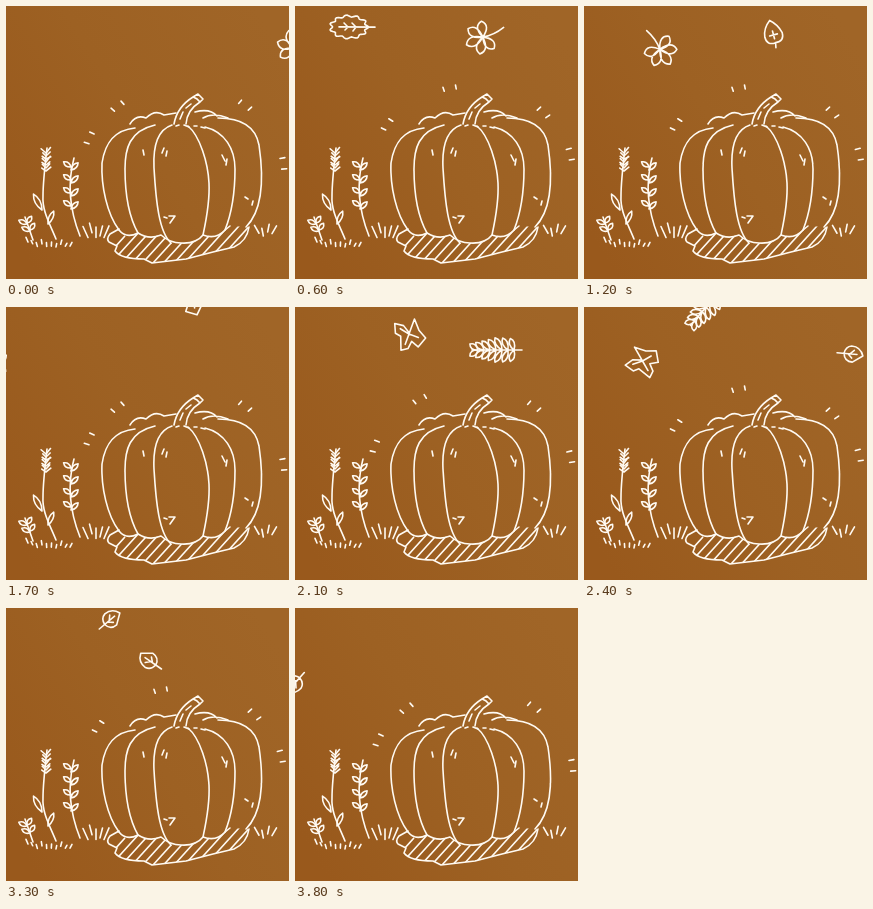
An HTML page for the animation above (3900 ms loop, 283x273 px).

```html
<!DOCTYPE html>
<html lang="en">
<head>
<meta charset="utf-8">
<title>Autumn pumpkin</title>
<style>
html, body { margin: 0; width: 100%; height: 100%; overflow: hidden; background: #9d6022; }
svg { display: block; width: 283px; height: 273px; }
.ink path { fill: none; stroke: #fffaf2; stroke-width: 1.6; stroke-linecap: round; stroke-linejoin: round; }
</style>
</head>
<body>
<svg viewBox="0 0 283 273">
  <defs>
    <linearGradient id="paper" x1="0" y1=".8" x2="1" y2=".2">
      <stop offset="0" stop-color="#99591c"/>
      <stop offset=".5" stop-color="#9d6123"/>
      <stop offset="1" stop-color="#a06527"/>
    </linearGradient>
    <clipPath id="ground">
      <path id="shadow" d="M113 223L104 228 102 235 111 240 109 245 119 252 138 253 146 257 180 253 207 246 228 241 240 232 243 221 224 220 210 231 197 229 185 237 165 237 155 229 142 231 132 227 120 231Z"/>
    </clipPath>
  </defs>
  <rect width="283" height="273" fill="url(#paper)"/>
  <g class="ink">
    <!-- pumpkin ribs -->
    <path d="M129 122C108 124 99 137 96 157C95 180 101 208 113 224"/>
    <path d="M149 119C123 125 119 143 119 163C119 188 123 211 132 227"/>
    <path d="M166 119C151 124 147 142 148 162C150 196 153 226 165 237"/>
    <path d="M182 120C194 130 202 157 203 177C204 197 200 215 197 229"/>
    <path d="M199 121C219 126 229 143 229 163C229 188 225 209 219 224"/>
    <path d="M212 112C239 112 250 123 253 139C258 173 256 205 240 221"/>
    <!-- crown, base, stalk -->
    <path d="M124 118Q130 108 140 112Q149 103 158 109L170 107M170 120L173 119M178 119L183 121M188 120L191 120M195 121L199 122M189 106Q204 102 211 110M197 112Q207 106 222 112"/>
    <path d="M113 224Q120 233 132 227Q143 234 155 229Q164 237 175 237Q190 238 197 229Q210 234 219 224L224 220"/>
    <path d="M168 118Q171 101 187 91L192 88 197 93 194 96Q181 104 180 118M187 91Q191 92 194 96M174 113L177 106M180 102L185 98"/>
    <path d="M137 144L138 149M158 142L156 147M161 145L160 150M216 149L219 155M221 153L220 159M239 191L242 193M247 195L246 199M158 211L161 212M163 210L169 210 164 217"/>
    <path d="M113 223L104 228Q100 233 103 236L111 240 109 245Q115 253 138 253L146 257 180 253 207 246 228 241Q241 235 243 221"/>
    <path id="hatch" clip-path="url(#ground)"/>
    <!-- plants -->
    <path d="M50 233C44 218 36 205 37 190Q37 176 41 142M74 230Q58 190 68 152M27 234L19 211"/>
    <path id="foliage"/>
    <path id="grass"/>
    <path id="rays"/>
    <g id="leaves"></g>
  </g>
</svg>
<script>
const LOOP = 3900, STEP = 100, SPIN = -100 / 600;
const $ = id => document.getElementById(id);
const repeat = (n, f) => Array.from({ length: n }, (_, i) => f(i)).join("");

let seed = 7;
const random = () => (seed = seed * 16807 % 2147483647) / 2147483647;

// Leaflet from (x, y); belly is where along its length it is widest
function petal(x, y, deg, length, width, belly = .55) {
  const a = deg * Math.PI / 180, c = Math.cos(a), s = Math.sin(a);
  const at = (u, v) => `${(x + u * c - v * s).toFixed(1)} ${(y + u * s + v * c).toFixed(1)}`;
  const u = length * belly;
  return `M${at(0, 0)}Q${at(u, -width)} ${at(length, 0)}Q${at(u, width)} ${at(0, 0)}`;
}

// Blades fan out from left to right across the tuft
const tuft = (x, width, n, y, length) => repeat(n, i => {
  const k = i / (n - 1), lean = (k - .5) * length;
  return `M${x + k * width} ${y + random() * 6 - 3}l${lean} ${-length * (.7 + random() * .5)}`;
});

$("hatch").setAttribute("d", repeat(15, i => `M${90 + i * 10.5} 262l38 -42`));
$("grass").setAttribute("d",
  tuft(22, 42, 10, 239, 4) + tuft(82, 16, 5, 229, 10) + tuft(253, 13, 4, 228, 9));
$("foliage").setAttribute("d",
  repeat(7, i => [-1, 1].map(side =>
    `M40 ${147 + i * 3}l${side * (3 + random() * 2)} ${-2 - random() * 4}`).join("")) +
  repeat(4, i => petal(65, 161 + i * 13, -145, 9, 4) + petal(65, 164 + i * 13, -45, 10, 4)) +
  repeat(2, i => petal(21 + i * 3, 218 + i * 7, -155, 9, 4) + petal(21 + i * 3, 217 + i * 7, -55, 8, 4)) +
  petal(36, 204, -118, 18, 5) + petal(42, 218, -66, 14, 4));

// Leaf outlines, each with its stem pointing along +x
const oak = repeat(73, i => {
  const a = i * Math.PI / 36, r = 1 + .09 * Math.cos(11 * a);
  return `${i ? "L" : "M"}${(-3 + 18 * r * Math.cos(a)).toFixed(1)} ${(11 * r * Math.sin(a)).toFixed(1)}`;
}) + "M-13 0H23M-8 -4L-4 0 -7 3M0 -4L4 0 1 4";
const chestnut = repeat(5, i => petal(2, 0, 70 + i * 55, 18 - Math.abs(i - 2), 9, .7)) + "M2 0Q13 3 25 0";
const linden = "M15 1L10 0Q11 -9 2 -9Q-7 -7 -13 0Q-7 8 2 9Q11 9 10 0M-2 0H6M2 -4V4";
const maple = "M16 0H1L6 -8 5 -17 -4 -13 -5 -7 -18 -2 -14 4 -6 5 -9 13 2 17 7 8ZM0 0L2 -10M0 0H-11M0 0V10";
const rowan = "M-25 0H25" + repeat(7, i => [-1, 1].map(side =>
  petal(17 - i * 6, 0, side * (108 + i * 6), 14 - Math.abs(i - 2), 5, .65)).join(""));
const birch = "M14 0H-6M7 0Q6 -8 -2 -8L-12 -1Q-9 8 0 8Q6 7 7 0M3 0L-1 -4M1 0L-3 4";

// Shape, stem angle at the first point, then points of the path as [time, x, y]
const flights = [
  [chestnut, 75, [0, 287, 40], [600, 186, 32], [1200, 77, 45]],
  [oak, 67, [200, 150, -18], [600, 57, 21]],
  [linden, 125, [900, 294, 60], [1200, 189, 27]],
  [maple, -70, [2100, 114, 27], [2700, 3, 81]],
  [rowan, 0, [2100, 202, 43], [2600, 70, -30]],
  [birch, 135, [2700, 226, 49], [3300, 144, 53], [3800, 0, 75]],
  [birch, 240, [2700, 253, 31], [3300, 104, 12], [3500, 62, -17]]
].map(([shape, angle, ...path]) => {
  const node = document.createElementNS("http://www.w3.org/2000/svg", "path");
  node.setAttribute("d", shape);
  $("leaves").append(node);
  return { node, angle, path };
});

// Linear along the path, carrying on past both ends
function position(path, t) {
  const i = path.length > 2 && t > path[1][0] ? 1 : 0;
  const [[t0, x0, y0], [t1, x1, y1]] = path.slice(i);
  const k = (t - t0) / (t1 - t0);
  return [x0 + (x1 - x0) * k, y0 + (y1 - y0) * k];
}

// Each pose places four pairs of strokes on an ellipse, by angle
const poses = {
  A: [215, 258, 315, 346],
  B: [205, 231, 308, 352],
  C: [200, 240, 308, 347],
  D: [209, 259, 310, 358]
};
const poseOrder = "BDACABDCADCAB";

function rays(angles) {
  return angles.flatMap(a => [a - 3.5, a + 3.5]).map(deg => {
    const a = deg * Math.PI / 180, c = Math.cos(a), s = Math.sin(a);
    return `M${176 + 100 * c} ${170 + 88 * s}l${5 * c} ${4 * s}`;
  }).join("");
}

function draw(now) {
  const t = Math.floor(now % LOOP / STEP) * STEP;
  $("rays").setAttribute("d", rays(poses[poseOrder[Math.floor(t / 300)]]));
  for (const { node, angle, path } of flights) {
    const [x, y] = position(path, t);
    const turn = angle + SPIN * (t - path[0][0]);
    node.setAttribute("transform", `translate(${x} ${y}) rotate(${turn})`);
  }
}

const start = performance.now();
function tick() {
  draw(performance.now() - start);
  requestAnimationFrame(tick);
}
tick();
</script>
</body>
</html>
```
